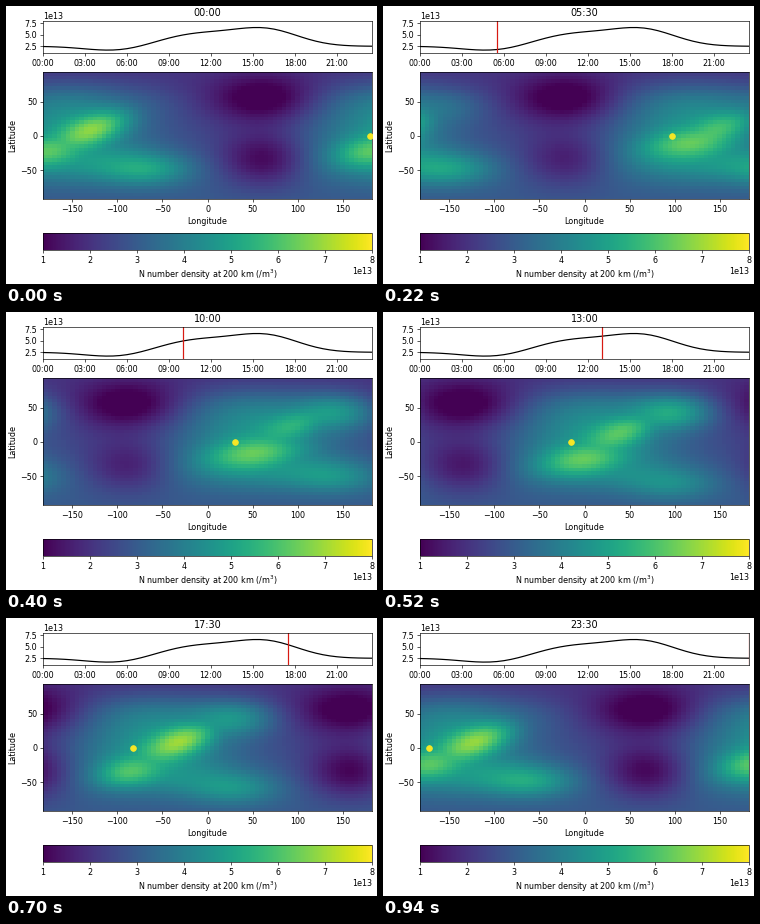
Animation of 371 by 278 pixels, one loop 960 ms. Source, as a matplotlib script:

```python
import numpy as np
import matplotlib.pyplot as plt
from matplotlib.animation import FuncAnimation

W, H, DPI = 371, 278, 58
FRAMES, INTERVAL = 48, 20
UNIT = 1e13

lon = np.arange(-180, 181, 5)
lat = np.arange(-90, 91, 5)
LON, LAT = np.meshgrid(lon, lat)


def gauss(x, center, width):
    return np.exp(-0.5 * ((x - center) / width) ** 2)


def wave(hour, peak):
    """Daily cosine with its maximum at the given hour."""
    return np.cos(2 * np.pi * (hour - peak) / 24)


def pulse(hour, peak, sharp):
    """Daily pulse of height 1."""
    return np.exp(sharp * (wave(hour, peak) - 1))


def wrap(a):
    return (a + 180) % 360 - 180


def sun_lon(hour):
    return 180 - 15 * hour


def density(hour):
    s = wrap(LON - sun_lon(hour))  # degrees east of the sun

    def hill(s0, lat0, ws, wl, tilt=0):
        ds = wrap(s - s0)
        return gauss(ds, 0, ws) * gauss(LAT - tilt * ds, lat0, wl)

    late = pulse(hour, 10, 4)
    drift = wave(hour, 8)

    evening = (2.1 + 0.65 * wave(hour, 20)) * hill(
        55 + 18 * late, 11 + 17 * late, 28, 16, 0.35)
    noon = 1.6 * hill(
        5 + 16 * drift, -23 + 13 * wave(hour, 6), 30 + 8 * drift, 15, 0.15)
    arm = (1.25 + 1.1 * wave(hour, 13.5)) * hill(115, 44, 32, 19)
    lobe = (1.6 + 0.3 * wave(hour, 1)) * hill(
        112, -48 - 18 * pulse(hour, 15, 2.5), 36, 17)
    # Soft maximum, so overlapping crests do not pile up
    crests = sum(c ** 4 for c in (evening, noon, arm, lobe)) ** 0.25

    base = 2.5 - 0.45 * np.sin(np.radians(LAT))
    day = 2.2 * gauss(wrap(s - 24), 0, 62) * np.exp(-((LAT - 5) / 70) ** 4)
    night = (1.6 * hill(-117, 54, 40, 24)
             + (1.55 + 0.35 * wave(hour, 20)) * hill(-117, -35, 34, 28))
    return np.clip(base + day + crests - night, 1, 8) * UNIT


def clock(hour):
    return f"{int(hour):02d}:{int(hour % 1 * 60):02d}"


fig = plt.figure(figsize=(W / DPI + 1e-6, H / DPI + 1e-6), dpi=DPI)


def panel(top, bottom, left=37, right=366):
    return fig.add_axes([left / W, 1 - bottom / H,
                         (right - left) / W, (bottom - top) / H])


# Daily curve
hours = np.arange(FRAMES) / 2
curve = (2.47 + 3.45 * gauss(hours, 16, 2.3) + 2.65 * gauss(hours, 11, 2.8)
         - 1.1 * gauss(hours, 5.4, 2.2))
top = panel(15, 47)
top.plot(hours, curve * UNIT, "k")
top.set_xlim(0, 23.5)
top.set_ylim(1 * UNIT, 8 * UNIT)
top.set_xticks(range(0, 24, 3), [clock(h) for h in range(0, 24, 3)])
top.set_yticks(np.array([2.5, 5, 7.5]) * UNIT)
now = top.axvline(0, color="#d81a12")
title = top.set_title(clock(0))

# Map
world = panel(66.4, 193.4)
mesh = world.pcolormesh(lon, lat, density(0), shading="nearest",
                        cmap="viridis", vmin=1 * UNIT, vmax=8 * UNIT)
sun = world.scatter([180], [0], s=50, color="#f5e626", zorder=3)
world.set_xlim(-182.5, 182.5)
world.set_ylim(-92.5, 92.5)
world.set_xticks(range(-150, 151, 50))
world.set_yticks([-50, 0, 50])
world.set_xlabel("Longitude")
world.set_ylabel("Latitude")

bar = fig.colorbar(mesh, cax=panel(227.2, 244.2), orientation="horizontal",
                   ticks=np.arange(1, 9) * UNIT)
bar.set_label("N number density at 200 km (/m$^3$)")


def draw(i):
    hour = hours[i]
    title.set_text(clock(hour))
    now.set_xdata([hour, hour])
    now.set_visible(i > 0)
    mesh.set_array(density(hour))
    sun.set_offsets([[sun_lon(hour), 0]])
    return title, now, mesh, sun


anim = FuncAnimation(fig, draw, frames=FRAMES, interval=INTERVAL,
                     repeat=True, repeat_delay=0, blit=False)
plt.show()
```
